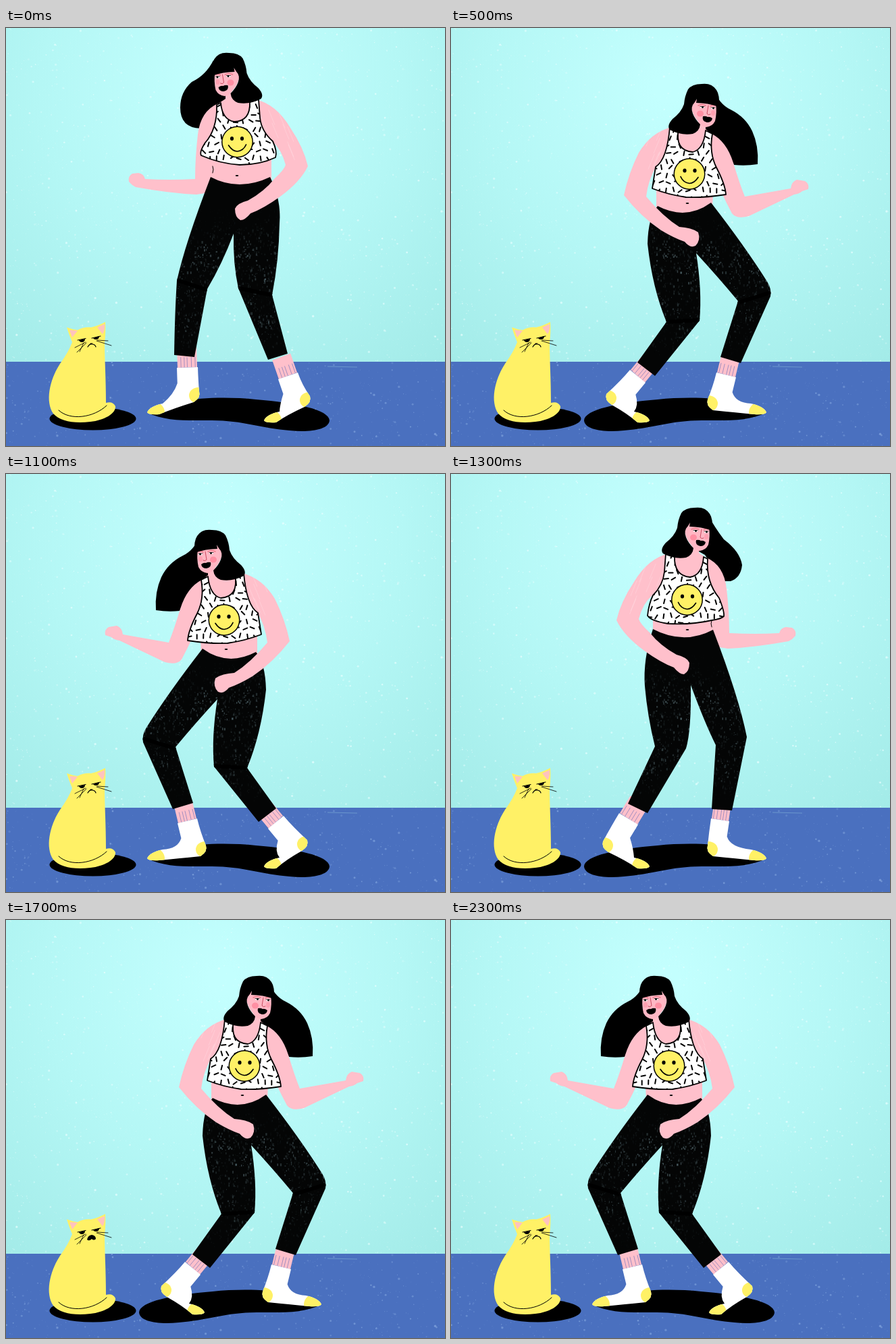
Recreate the animation shown at these times as an HTML page with a canvas. Size 650 by 620 pixels, loop 2.4 s.

```html
<!DOCTYPE html>
<html lang="en">
<head>
<meta charset="utf-8">
<title>Boxing dance</title>
<style>
html, body { margin: 0; width: 650px; height: 620px; overflow: hidden; }
canvas { display: block; }
</style>
</head>
<body>
<canvas id="stage" width="650" height="620"></canvas>
<script>
const stage = document.getElementById('stage');
const SKIN = '#ffc0cb', YELLOW = '#fff166', BLACK = '#000', WHITE = '#fff', FLOOR = '#4a70bf';
const MIRROR = 676;
let ctx = stage.getContext('2d');

function random(seed) {
  return () => (seed = (seed * 16807) % 2147483647) / 2147483647;
}
function fill(d, color) {
  ctx.fillStyle = color;
  ctx.fill(new Path2D(d));
}
function line(d, width = 1, color = BLACK) {
  ctx.strokeStyle = color;
  ctx.lineWidth = width;
  ctx.stroke(new Path2D(d));
}
function oval(x, y, rx, ry, color) {
  ctx.fillStyle = color;
  ctx.beginPath();
  ctx.ellipse(x, y, rx, ry, 0, 0, 7);
  ctx.fill();
}
function inside(d, draw) {
  ctx.save();
  ctx.clip(new Path2D(d));
  draw();
  ctx.restore();
}
function at(x, y, draw) {
  ctx.save();
  ctx.translate(x, y);
  draw();
  ctx.restore();
}

// All poses face left. Feet: sock top left, sock top right, heel.
const mid = {
  head: [0, 0], shift: [0, 0], smile: [326.5, 181], navel: [326, 231], sideLine: true,
  hair: 'M292 60Q284 78 265 86Q246 98 246 122Q250 155 270 155Q285 145 300 120L318 110Z',
  torso: 'M309 105L309 117L297 125L285 205L289 236L293 250L372 250L377 236L377 200L358 119L330 115Z',
  frontArm: 'M298 124Q272 135 268 170Q264 205 264 236Q225 238 190 236Q188 228 180 227L171 228Q164 232 166 240Q170 245 176 248Q225 257 266 259L285 256L292 215L300 200Z',
  rearArm: 'M354 118Q384 125 405 160Q425 190 431 217Q420 240 390 262Q365 280 346 287Q338 297 331 297Q323 293 323 280Q326 272 342 268Q366 255 382 235Q396 222 398 215Q392 192 378 180Q360 165 354 118Z',
  shirt: 'M296 126C297 150 290 170 279 182Q270 196 273 201Q300 213 330 215Q360 215 383 204Q386 195 379 180Q362 165 360 145L358 118L345 122Q346 150 322 151Q304 148 302 123Z',
  pants: 'M288 231Q331 254 377 230Q392 275 389 315Q385 360 374 404L414 489L385 503L328 407Q320 380 321 313Q300 370 284 402L290 497L260 499L238 390Q250 330 288 231Z',
  crease: '',
  front: [264, 515, 291, 511, 296, 551], rear: [399, 520, 427, 503, 451, 545]
};
const midRight = {
  ...mid, smile: [326.5, 186.5],
  hair: 'M296 60Q285 80 272 97Q248 115 245 135Q247 154 262 159L271 159Q285 145 300 120L318 110Z',
  shirt: 'M296 126C298 150 292 168 279 184Q271 204 272 211Q276 215 290 217Q320 224 355 222Q380 218 385 210Q383 192 377 180Q362 165 360 145L358 118L345 122Q346 151 322 153Q304 150 302 123Z'
};
const tall = {
  ...mid, head: [15.5, -13], shift: [16, -12],
  hair: 'M307 48Q296 70 275 80Q258 95 258 118Q258 148 288 149Q305 120 332 100Z',
  pants: 'M303 221Q345 243 391 221Q408 255 405 290Q404 345 394 396L417 483L388 492L344 386Q336 350 337 305Q320 350 298 387L279 488L249 485Q250 420 253 375Q265 320 303 221Z',
  crease: 'M254 374L296 388M345 386L393 396',
  front: [253, 504, 284, 503, 286, 539], rear: [403, 521, 432, 511, 450, 546]
};
const low = {
  head: [-10, 33], shift: [0, 0], smile: [323, 216.5], navel: [326, 260],
  hair: 'M288 90Q279 113 262 121Q240 132 230 153Q220 175 222 202Q240 205 257 203Q275 165 305 150Z',
  torso: 'M299 134L299 150L284 162L289 266L293 282L372 280L372 205L350 148L320 145Z',
  frontArm: 'M290 157Q268 168 258 200Q249 230 241 250L173 238Q172 228 164 225L152 227Q145 231 147 239L156 242Q160 246 168 247L235 279Q253 284 260 275Q268 260 275 245L290 200Z',
  rearArm: 'M350 147Q380 155 398 185Q413 215 420 248Q395 280 365 300Q345 312 330 317Q322 327 314 323Q306 315 310 303Q320 296 338 295Q362 280 387 250Q384 225 372 205Q355 190 350 147Z',
  shirt: 'M289 157Q294 185 283 207Q270 232 269 247Q300 252 328 251Q355 247 378 238L373 206Q356 195 352 147L339 149Q345 182 318 184Q302 180 299 152Z',
  pants: 'M291 259Q328 286 370 264Q384 280 385 320Q378 385 357 436L400 496L374 516L308 434Q304 390 313 334Q280 370 251 405L277 488L247 497L203 398Q201 387 208 376Q240 325 291 259Z',
  crease: 'M205 393L250 407M308 433L357 436',
  front: [254, 518, 283, 511, 296, 551], rear: [388, 526, 411, 507, 446, 543]
};
const deep = {
  head: [-18, 32], shift: [0, 0], smile: [321, 214], navel: [328, 257],
  hair: 'M272 90Q262 118 244 128Q226 142 222 165Q214 184 200 193Q203 211 230 212Q250 205 262 185Q278 160 298 140Z',
  torso: 'M291 135L291 152L283 162L288 266L292 284L357 284L374 238L374 200L342 142Z',
  frontArm: 'M281 157Q252 175 243 205Q234 230 223 248Q190 236 165 224Q163 204 150 203Q139 210 142 223Q148 232 162 234Q190 252 218 272Q234 284 243 274Q256 255 268 240L287 200Z',
  rearArm: 'M340 142Q375 155 390 180Q410 210 419 240Q395 268 365 288Q345 301 331 306Q320 316 313 312Q304 305 310 290Q315 283 330 282Q350 272 372 253Q384 243 388 238Q382 215 372 203Q350 185 340 142Z',
  shirt: 'M343 141Q350 190 373 203L379 231Q350 249 320 250Q295 250 271 244Q278 215 284 190Q287 170 283 157L293 152Q296 178 310 182Q333 180 330 142Z',
  pants: 'M357 264Q325 285 288 265Q246 320 204 378Q196 388 202 400L248 496L276 487L248 400Q285 360 311 332Q318 380 321 432L374 511L402 494L367 422L380 337Q396 330 398 305Q398 275 357 264Z',
  crease: 'M366 426L321 425M203 388L247 402',
  front: [254, 518, 282, 511, 295, 550], rear: [391, 527, 418, 514, 446, 545]
};
const steps = [
  mid, low, deep, deep, low, tall,
  midRight, low, deep, deep, low, tall
];

function paintRoom() {
  const room = document.createElement('canvas');
  room.width = 650;
  room.height = 620;
  const main = ctx, rnd = random(41);
  ctx = room.getContext('2d');
  const wall = ctx.createRadialGradient(320, 90, 20, 320, 90, 520);
  wall.addColorStop(0, '#c3fffe');
  wall.addColorStop(.5, '#b4f7f5');
  wall.addColorStop(1, '#a3ebe8');
  ctx.fillStyle = wall;
  ctx.fillRect(0, 0, 650, 495);
  ctx.fillStyle = FLOOR;
  ctx.fillRect(0, 495, 650, 125);
  for (let i = 0; i < 3200; i++) {
    const x = rnd() * 650, y = rnd() * 620, size = .45 + rnd() ** 5 * 1.3;
    const alpha = .2 + rnd() * .5;
    oval(x, y, size, size, y < 495 ? `rgba(235,255,255,${alpha})` : `rgba(135,170,225,${alpha})`);
  }
  line('M476 502L520 503', 1, 'rgba(140,190,220,.5)');
  ctx = main;
  return room;
}

function drawCat(blink, yowl) {
  oval(128.5, 579.5, 64, 17, BLACK);
  fill('M90 444Q98 447 106 448Q116 443 126 444Q138 441 147 436Q148 450 146 467C146 490 148 520 148 556Q158 553 162 561C163 572 145 582 125 584C100 587 80 583 70 572C58 554 64 523 80 498Q93 480 98 466Q93 454 90 444Z', YELLOW);
  fill('M94 448L106 449L98 459Z M135 444L146 439Q147 448 143 454Z', '#ffc3bd');
  line('M78 567C95 583 130 578 149 560', 1);
  if (blink) {
    line('M106 465Q111 468 117 463M127 461Q133 464 140 458', 1.3);
  } else {
    fill('M108 463L117 461Q117 466 112 466Q109 466 108 463ZM129 460L138 457Q138 462 133 462Q130 462 129 460Z', BLACK);
    line('M106 463L118 460.5M127 460L140 457', 1.2);
  }
  line('M118 466L102 474M119 467L105 481M115 467L109 480M135 463L151 464M134 464L156 471', .8);
  if (yowl) fill('M120 474Q121 468 127 467Q133 468 133 473Q130 476 127 473Q123 477 120 474Z', BLACK);
  else line('M121 473Q124 468 127 469Q132 469 133 473M125 468L128 468', 1.2);
}

function drawFoot([ax, ay, bx, by, hx, hy], tx, ty) {
  const width = Math.hypot(bx - ax, by - ay);
  const dx = (ay - by) / width, dy = (bx - ax) / width;
  const ix = ax + dx * 23, iy = ay + dy * 23;
  const ankle = `M${ax + 1} ${ay}L${bx - 1} ${by}L${bx - 1 - dx * 30} ${by - dy * 30}L${ax + 1 - dx * 30} ${ay - dy * 30}Z`;
  fill(ankle, SKIN);
  for (const k of [.2, .36, .5, .7, .88]) {
    const x = ax + (bx - ax) * k, y = ay + (by - ay) * k;
    line(`M${x} ${y}L${x - dx * 15} ${y - dy * 15}`, .8, '#8a83bd');
  }
  const sock = `M${ax} ${ay}L${bx} ${by}Q${bx + dx * 20} ${by + dy * 20} ${hx} ${hy}Q${hx + 3} ${hy + 9} ${hx - 8} ${hy + 16}Q${(hx + tx) / 2} ${(hy + 16 + ty) / 2 + 2} ${tx + 18} ${ty + 3}Q${tx + 2} ${ty + 4} ${tx} ${ty}Q${tx + 4} ${ty - 9} ${tx + 23} ${ty - 13}Q${ix - 5} ${iy + 16} ${ix} ${iy}Z`;
  fill(sock, WHITE);
  inside(sock, () => {
    oval(hx - 1, hy + 6, 14, 12, YELLOW);
    oval(tx + 8, ty, 18, 16, YELLOW);
  });
}

function drawPants({ pants, crease }) {
  fill(pants, '#040505');
  inside(pants, () => {
    const rnd = random(77);
    for (let i = 0; i < 2800; i++) {
      const x = 200 + rnd() * 215, y = 265 + rnd() * 220;
      const worn = Math.exp(-(((y - 350) / 45) ** 2)) + .7 * Math.exp(-(((y - 430) / 35) ** 2));
      const patch = worn * (.6 + .4 * Math.sin(x / 9) * Math.cos(y / 13));
      ctx.fillStyle = `rgba(140,175,185,${rnd() ** 2 * .65 * patch})`;
      ctx.fillRect(x, y, .7 + rnd() * 1.8, .7 + rnd() * 3.5);
    }
    line(crease, 6);
  });
}

function drawShirt({ shirt, smile: [x, y] }) {
  fill(shirt, WHITE);
  inside(shirt, () => {
    const rnd = random(9);
    for (let row = -6; row < 5; row++) {
      for (let col = -5; col < 6; col++) {
        const px = x + (col + (row & 1) / 2) * 11 + rnd() * 4, py = y + row * 11 + rnd() * 4;
        const angle = rnd() * Math.PI, cx = Math.cos(angle) * 3.2, cy = Math.sin(angle) * 3.2;
        line(`M${px - cx} ${py - cy}L${px + cx} ${py + cy}`, 2);
      }
    }
  });
  line(shirt, 1.8);
  at(x, y, () => {
    oval(0, 0, 23.5, 23.5, BLACK);
    oval(0, 0, 22, 22, YELLOW);
    oval(-8, -5, 2.6, 3, BLACK);
    oval(7, -5, 2.6, 3, BLACK);
    line('M-13 5Q-7 14 0 14Q9 13 13 4', 1.7);
  });
}

function drawHead() {
  fill('M294 79Q292 92 295 105Q299 113 308 114Q316 113 320 106Q328 97 330 86Q328 78 323 73L305 74Z', '#ffb7c4');
  oval(317, 94, 5, 4.5, '#ff8fa3');
  oval(298, 93, 3, 4, '#ffa0b1');
  line('M295 82Q299 80 302 83M309 82Q314 79 320 82', 1.6, '#ee7b8c');
  for (const [x, y] of [[298, 86], [314, 84.5]]) {
    oval(x, y, 3.2, 1.4, WHITE);
    oval(x - .5, y, 1.4, 1.4, BLACK);
    line(`M${x - 3} ${y - 1}L${x + 3} ${y - 1}`, .7);
  }
  line('M305 82L307 94Q305 97 302 95', 1, '#c94a5f');
  fill('M299 101Q303 98 306 99Q309 97 313 98Q315 105 307 107Q300 107 299 101Z', BLACK);
  fill('M289 84Q288 66 293 59Q300 48 315 50Q329 50 335 58Q340 68 341 80Q345 92 358 102Q367 112 362 118Q345 127 328 124Q318 120 317 110Q325 102 328 94Q332 84 325 77L322 72L323 78Q306 78 289 84Z', BLACK);
}

function drawDancer(pose) {
  fill('M209 570C240 550 310 545 370 551C430 556 478 566 479 582C478 596 450 600 420 597C380 594 350 582 305 582C270 582 235 584 209 570Z', BLACK);
  drawFoot(pose.front, 209, 570);
  drawFoot(pose.rear, 382, 582);
  fill(pose.hair, BLACK);
  at(...pose.shift, () => {
    fill(pose.torso, SKIN);
    fill(pose.frontArm, SKIN);
  });
  drawPants(pose);
  at(...pose.shift, () => {
    fill(pose.rearArm, SKIN);
    inside(pose.rearArm, () => {
      const rnd = random(5);
      for (let i = 0; i < 14; i++) {
        const x = 355 + rnd() * 50, y = 130 + rnd() * 85;
        line(`M${x} ${y}l9 22`, .6, 'rgba(255,235,240,.45)');
      }
    });
    oval(...pose.navel, 2.4, 1, BLACK);
    drawShirt(pose);
    if (pose.sideLine) line('M290 217Q292 222 290 227');
  });
  at(...pose.head, drawHead);
}

const room = paintRoom();
ctx.lineCap = 'round';
ctx.lineJoin = 'round';

function render() {
  const t = performance.now() % 2400;
  const step = Math.floor((t + 1700) % 1200 / 100);
  ctx.drawImage(room, 0, 0);
  drawCat(t >= 300 && t < 500, t >= 1500 && t < 2100);
  ctx.save();
  if (step >= 6) ctx.transform(-1, 0, 0, 1, MIRROR, 0);
  drawDancer(steps[step]);
  ctx.restore();
  requestAnimationFrame(render);
}
render();
</script>
</body>
</html>
```
